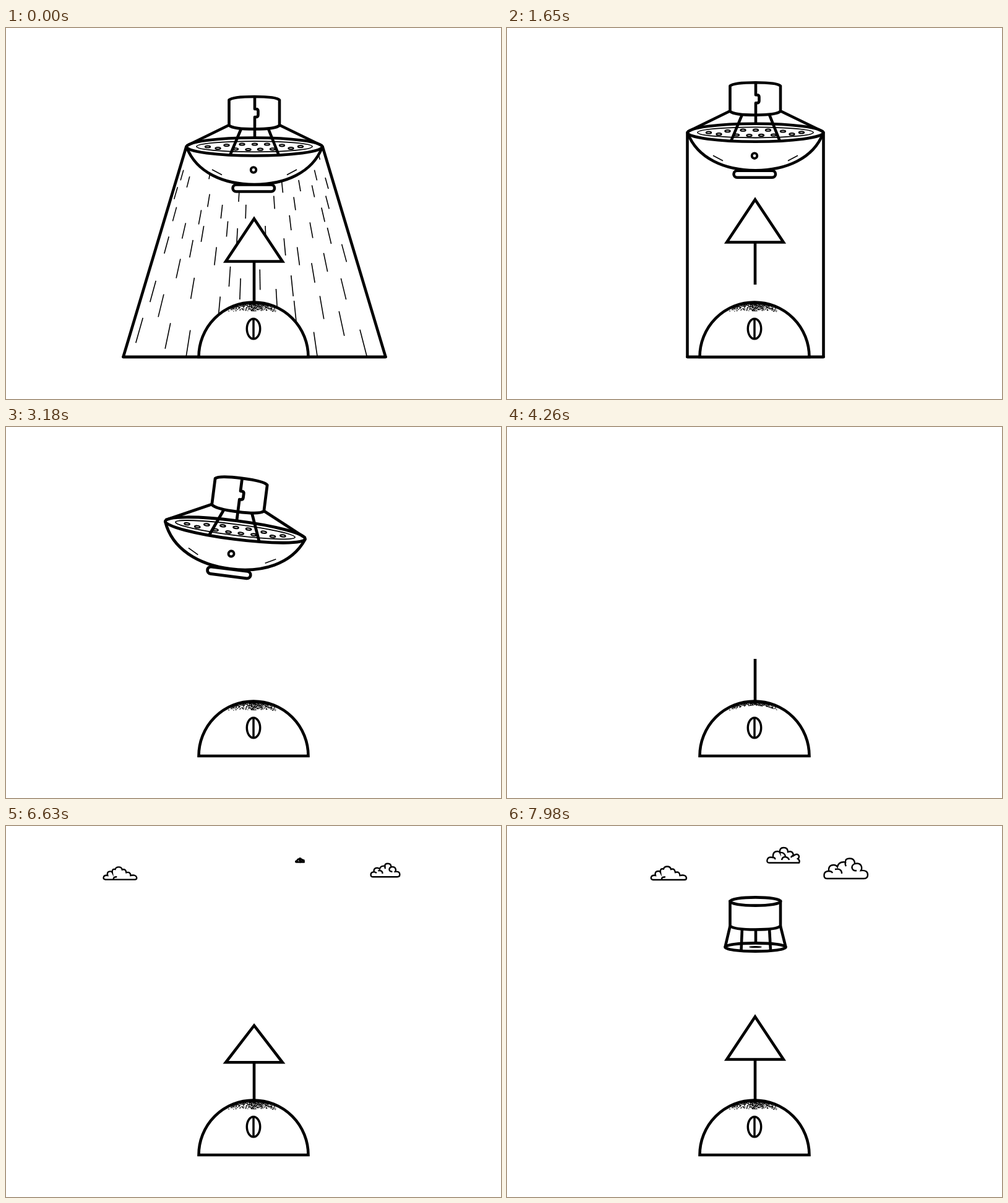
These frames come from a looping animation (800x600 px, 8 s). An HTML page with a canvas:

```html
<!DOCTYPE html>
<html lang="en">
<head>
<meta charset="utf-8">
<title>Saucer and seed</title>
<style>
html, body { margin: 0; width: 100%; height: 100%; overflow: hidden; background: #fff; }
canvas { display: block; width: 800px; height: 600px; }
</style>
</head>
<body>
<canvas id="stage" width="800" height="600"></canvas>
<script>
const g = document.getElementById('stage').getContext('2d');
const LOOP = 8000, BOLD = 4.6, BASE = 532, MID = 401.5, APEX = -173;

const clamp = v => Math.max(0, Math.min(1, v));
const smooth = p => p * p * (3 - 2 * p);
const linear = p => p;
const cubic = p => p < .5 ? 4 * p ** 3 : 1 - 4 * (1 - p) ** 3;

// value at time t from steps of [time, value]
function track(t, steps, ease = smooth) {
  if (t <= steps[0][0]) return steps[0][1];
  for (let i = 1; i < steps.length; i++) {
    const [a, u] = steps[i - 1], [b, v] = steps[i];
    if (t <= b) return u + (v - u) * ease((t - a) / (b - a));
  }
  return steps[steps.length - 1][1];
}

function draw(path, width = BOLD, fill = false) {
  if (fill) g.fill(path);
  g.lineWidth = width;
  g.stroke(path);
}
const svg = (d, width, fill) => draw(new Path2D(d), width, fill);
const line = (x1, y1, x2, y2, width) => svg(`M${x1} ${y1}L${x2} ${y2}`, width);
function oval(x, y, rx, ry, width, fill) {
  const p = new Path2D();
  p.ellipse(x, y, rx, ry, 0, 0, Math.PI * 2);
  draw(p, width, fill);
}

// midpoints of the rain strokes: x, y, x, y ...
const rain = [
  284,238, 294,249, 274,267, 329,236, 327,279, 348,297, 376,271, 387,297,
  272,301, 313,306, 287,328, 317,333, 357,325, 259,351, 299,357, 338,369,
  373,337, 278,389, 361,402, 378,422, 410,407, 237,426, 301,421, 250,449,
  344,453, 215,489, 261,498, 294,510, 505,206, 500,238, 518,251, 446,257,
  474,255, 496,264, 433,282, 519,282, 466,284, 512,302, 459,315, 493,327,
  522,336, 419,333, 450,354, 546,364, 472,369, 516,379, 496,396, 462,417,
  545,422, 437,440, 467,460, 510,452, 542,478, 577,509, 500,513
];

let seed = 7;
const rnd = () => (seed = (seed * 16807) % 2147483647) / 2147483647;
const dots = Array.from({ length: 520 }, () => {
  const u = (rnd() + rnd()) - 1, side = u * 42;
  const depth = 2 + 13 * Math.pow(rnd(), 1.9) * (1 - .6 * Math.abs(u));
  return { x: 400 + side, y: BASE - Math.sqrt(88.5 ** 2 - side ** 2) + depth, depth };
});

const clouds = [
  { shape: 'M236 87Q232 86 233 83Q234 79 240 80Q238 73 245 73Q247 73 248 75Q247 68 253 69.5Q254 65.5 259 65.5Q264 65.5 265 70Q271 68 272 75Q279 73 279.5 80Q289 78 290 84Q290 87 287 87ZM250 86Q250 82 256 82.5',
    x: 261, y: 80,
    path: [[5600, 142], [6300, 166], [6630, 184], [7980, 261]],
    grow: [[5600, 0], [6300, .7], [6630, .94], [7000, 1]], ease: linear },
  { shape: 'M424 59.5Q419.5 59.5 420.5 55Q422 49 430 51Q429 41 437 41Q440 41 441 43Q440 35 447 35Q454 35 454 42Q462 39 463 48Q470 43 472 49Q472 52 470 53Q474 56 472 59.5ZM444 55Q445 49.5 450 50Q455 51 456 55M441 43Q448 42 450 49M463 48Q460 48 459 51M430 51Q434 51 433 54',
    x: 446.5, y: 58.3,
    path: [[6300, 482], [7980, 446.5]],
    grow: [[6312, 0], [7262, 1]], ease: smooth },
  { shape: 'M517 85Q512 85 512.5 79Q513 73 520 73Q519 63 528 63Q532 63 534 66Q536 57 547 58.5Q546 52.5 554 52.5Q562 52.5 562 61Q571 59 573 66Q574 69 572 72Q583 71 583 79Q583 85 577 85ZM520 73Q525 73 526 76M530 70Q541 68 541 77M547 58.5Q546 62 548 65M562 61Q556 64 558 69Q560 73 565 72',
    x: 547.7, y: 77,
    path: [[6050, 641], [7980, 547.7]],
    grow: [[6050, 0], [7000, 1]], ease: smooth }
];

function drawCloud(c, t) {
  const s = track(t, c.grow, c.ease);
  if (s < .02) return;
  const p = new Path2D();
  const m = new DOMMatrix().translate(track(t, c.path, linear), c.y).scale(s).translate(-c.x, -c.y);
  p.addPath(new Path2D(c.shape), m);
  draw(p, 2.4, true);
}

function drawBeam(t, dy) {
  if (t > 2800) return;
  const foot = track(t, [[390, 212], [952, 110]], cubic);
  const top = 191.5 + dy;
  const end = track(t, [[2380, BASE], [2780, top + 6]], cubic);
  const half = 110 + (foot - 110) * (end - top) / (BASE - top);
  const area = new Path2D(`M${MID - 110} ${top}L${MID - half} ${end}H${MID + half}L${MID + 110} ${top}`);
  if (t < 640) {
    g.save();
    g.clip(area);
    for (let i = 0; i < rain.length; i += 2) {
      const x = rain[i] + .5, y = rain[i + 1];
      const left = 1 - clamp((t - 60 - (i * 37 % 200)) / 330);
      if (!left) continue;
      const drift = 1 + t * .0003;
      const ny = APEX + (y - APEX) * drift, nx = MID + (x - MID) * drift;
      const h = (17 + (y - 240) * .095) / 2 * left;
      const k = (x - MID) / (y - APEX);
      line(nx - k * h, ny - h, nx + k * h, ny + h, 1.6);
    }
    g.restore();
  }
  g.lineCap = g.lineJoin = 'round';
  draw(area);
  line(MID - half, end, MID + half, end);
  g.lineCap = 'butt';
  g.lineJoin = 'miter';
}

function drawTree(t, dy) {
  if (t > 2250 && t < 3900) return;
  g.save();
  if (t < 3000) {
    const lift = t > 1400 ? .000496 * (t - 1400) ** 2 : 0;
    g.beginPath();
    g.rect(0, 205 + dy, 800, 400);
    g.clip();
    g.translate(0, -lift);
  }
  const late = t > 3000;
  const size = late ? track(t, [[4480, 0], [4680, .82], [4880, 1.4], [5080, .86], [5270, 1.08], [5440, 1]]) : 1;
  const base = 377.5 + (late ? track(t, [[6180, 0], [6600, 5], [6840, -1], [7080, 0]]) : 0);
  const drop = late ? track(t, [[6180, 0], [6600, 15], [6840, -4], [7080, 0]]) : 0;
  const stem = late && size < .03 ? track(t, [[3900, 446], [4230, 375]]) : base;
  line(401, stem, 401, 446);
  if (size >= .03) {
    const h = (base - 308.5 - drop) * size, w = 45.8 * size;
    svg(`M401 ${base - h}L${401 + w} ${base}H${401 - w}Z`, BOLD, true);
  }
  g.restore();
}

function drawSaucer(t, dy) {
  if (t > 3750) return;
  let dx = track(t, [[2620, 0], [3060, -56]]);
  if (t > 3060) dx += .00139 * (t - 3060) ** 2;
  const lean = track(t, [[2620, 0], [3060, 1]]);
  g.save();
  g.translate(400 + dx, 229.5 + dy);
  g.rotate(lean * 7.25 * Math.PI / 180);
  g.scale(1 + lean * .04, 1 + lean * .04);
  g.translate(-400, -229.5);
  g.lineJoin = 'round';

  svg('M292 193C308 234 352 253 401.5 253S495 234 511 193Z', BOLD, true);
  oval(MID, 192, 109.5, 14.5, BOLD, true);
  oval(MID, 191.7, 93.5, 8.6, 1.8);
  const holes = [326, 192, 342.5, 194.5, 356.5, 189.5, 371, 195.8, 381.5, 188, 391.5, 196.5, 402, 188,
    411, 196.2, 422, 188, 431, 195.8, 446, 189.8, 460.5, 194.5, 476, 191.7];
  for (let i = 0; i < holes.length; i += 2) oval(holes[i], holes[i + 1], 4.2, 1.6, 2);
  line(360.5, 157, 292, 190.5);
  line(442, 157, 511, 190.5);
  line(380, 163, 362, 206);
  line(424, 163, 441, 206);
  svg('M360.5 116.5Q366 111 401.5 111T442 116.5V157.5Q436 163.5 401.5 163.5T360.5 157.5Z', BOLD, true);
  svg('M402 111V131H404Q407.5 131 407.5 134.5V140.5Q407.5 144 404 144H402V178');
  line(333, 229, 349, 237.5, 1.6);
  line(454, 237.5, 470, 229, 1.6);
  oval(400, 229.5, 4.3, 4.3, 3.8);
  const pill = new Path2D();
  pill.roundRect(366.5, 253.5, 67.5, 11, 5.5);
  draw(pill, BOLD, true);
  g.restore();
}

function drawDome(t) {
  svg(`M311.5 ${BASE}A88.5 88.5 0 0 1 488.5 ${BASE}Z`, BOLD, true);
  const reach = track(t, [[3400, 16], [3700, 0], [4000, 0], [4260, 7], [4600, 16]], linear);
  g.fillStyle = '#000';
  for (const d of dots) if (d.depth < reach) g.fillRect(d.x - .6, d.y - .6, 1.2, 1.2);
  g.fillStyle = '#fff';
  oval(400, 486.5, 10.7, 16.2, 3.5);
  line(400, 471, 400, 502, 3.5);
}

// new cabin with legs, before the bowl opens
function drawCabin(t) {
  const s = track(t, [[7200, 0], [7420, 1.12], [7560, 1]]);
  if (s < .03) return;
  const len = track(t, [[7480, 0], [7680, 1.75], [7840, 1]]);
  if (len > .03) {
    const y = 163 + 33 * len, w = track(t, [[7760, 41], [7980, 49]]);
    const k = (w - 41) / 8;
    oval(MID, y, w, 6.6, BOLD, true);
    const dot = track(t, [[7840, 0], [7980, 1]]);
    if (dot > .05) oval(MID, y - .5, 9.5 * dot, .8, 1.6);
    line(360.5, 162, MID - w, y);
    line(442, 162, MID + w, y);
    line(380, 165, 380 - 1.5 * k, y + 5.5);
    line(424, 165, 424 + 2 * k, y + 5.5);
    line(402, 165, 402, y - 6);
  }
  g.save();
  g.translate(MID, 142);
  g.scale(s, s);
  g.translate(-MID, -142);
  svg('M360.5 122V161.5Q366 167.5 401.5 167.5T442 161.5V122Z', BOLD, true);
  oval(MID, 122, 40.8, 6.6, BOLD, true);
  g.restore();
}

function render(t) {
  g.fillStyle = '#fff';
  g.strokeStyle = '#000';
  g.fillRect(0, 0, 800, 600);
  const dy = track(t, [[0, 0], [690, 22], [1340, -31], [1720, -22], [2080, -31], [2480, -24.5],
    [3180, -24.5], [3740, -74]]);
  drawBeam(t, dy);
  drawTree(t, dy);
  drawSaucer(t, dy);
  drawDome(t);
  clouds.forEach(c => drawCloud(c, t));
  drawCabin(t);
}

const start = performance.now();
function tick() {
  const t = (performance.now() - start) % LOOP;
  render(Math.floor(t / 30) * 30);
  requestAnimationFrame(tick);
}
tick();
</script>
</body>
</html>
```
